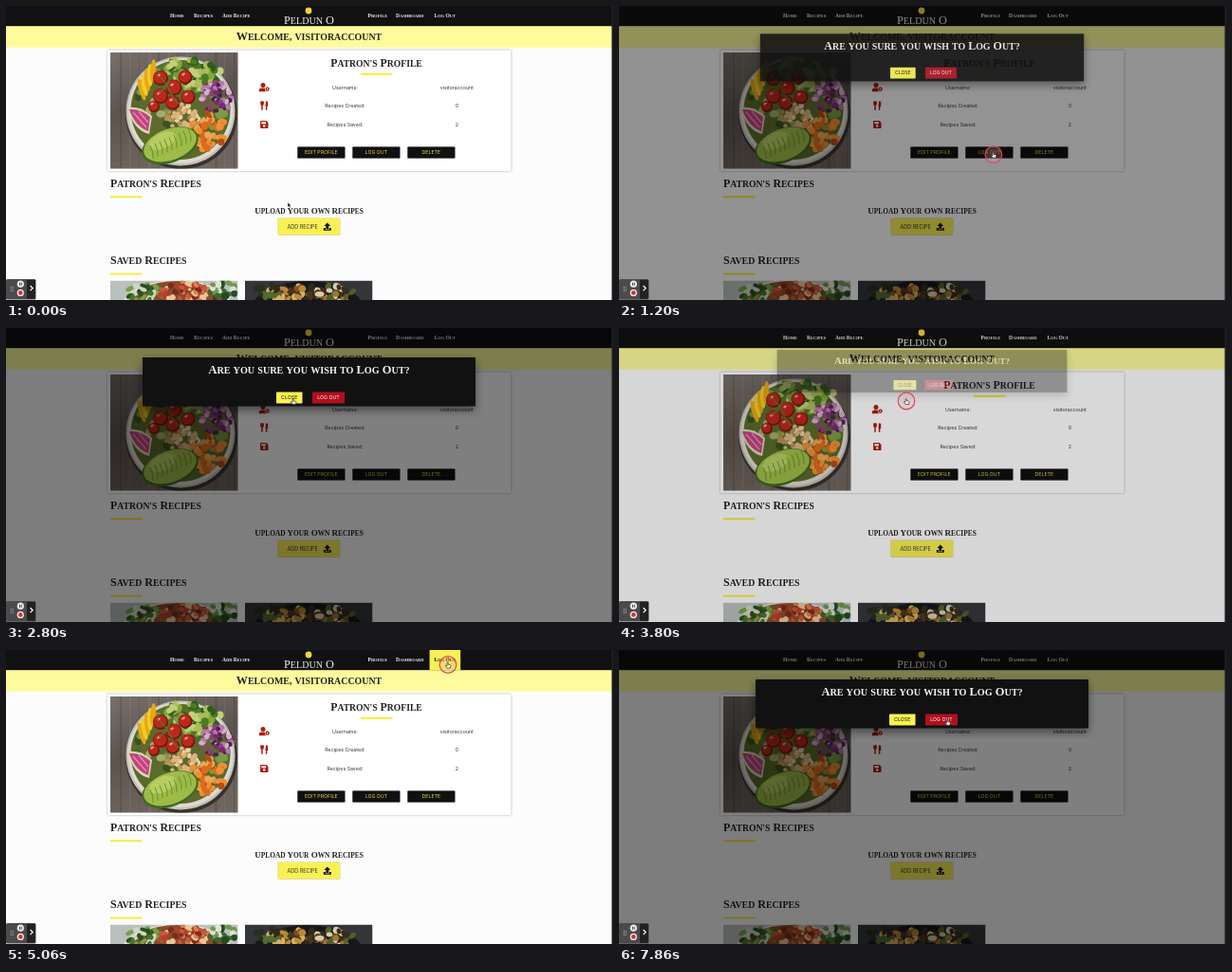
Write an HTML page that moves like this. It is 640 px wide and 310 px high and loops after 8 s.

```html
<!DOCTYPE html>
<html lang="en">
<head>
<meta charset="utf-8">
<title>Recipe profile</title>
<style>
html, body { margin: 0; width: 100%; height: 100%; overflow: hidden; background: #fcfcfc; }
svg { display: block; width: 640px; height: 310px; }
.serif { font-family: "Liberation Serif", "Times New Roman", serif; font-weight: 700; }
.sans { font-family: Inter, "Open Sans", sans-serif; font-size: 5.25px; }
.lift { filter: drop-shadow(0 .7px .7px rgba(0,0,0,.4)); }
</style>
</head>
<body>
<svg id="stage" viewBox="0 0 640 310" xmlns="http://www.w3.org/2000/svg"></svg>
<script>
const INK = '#111', TITLE = '#222', YELLOW = '#f9f055', RED = '#b01c0c', LOOP = 8000;
const stage = document.getElementById('stage');

// Seeded random numbers for the food textures
let seed = 11;
const rnd = () => (seed = seed * 16807 % 2147483647) / 2147483647;

const rect = (x, y, w, h, fill, more = '') =>
  `<rect x="${x}" y="${y}" width="${w}" height="${h}" fill="${fill}" ${more}/>`;
const dot = (x, y, r, fill, more = '') => `<circle cx="${x}" cy="${y}" r="${r}" fill="${fill}" ${more}/>`;
const blob = (x, y, rx, ry, fill, turn = 0) =>
  `<ellipse cx="${x}" cy="${y}" rx="${rx}" ry="${ry}" fill="${fill}" transform="rotate(${turn} ${x} ${y})"/>`;
const path = (d, fill, more = '') => `<path d="${d}" fill="${fill}" ${more}/>`;

// Capitals with slightly smaller capitals in place of lower case
function caps(x, y, text, size, fill = TITLE, anchor = 'middle', more = '') {
  const body = text.replace(/[a-z',?]+/g, s => `<tspan font-size="${size * 0.82}">${s.toUpperCase()}</tspan>`);
  return `<text class="serif" x="${x}" y="${y}" font-size="${size}" fill="${fill}" text-anchor="${anchor}" ${more}>${body}</text>`;
}
const label = (x, y, text, fill = '#333', more = '') =>
  `<text class="sans" x="${x}" y="${y}" fill="${fill}" text-anchor="middle" ${more}>${text}</text>`;

function scatter(n, x, y, rx, ry, r, colors) {
  let out = '';
  for (let i = 0; i < n; i++) {
    const a = rnd() * 6.283, d = Math.sqrt(rnd());
    out += blob((x + Math.cos(a) * d * rx).toFixed(1), (y + Math.sin(a) * d * ry).toFixed(1),
      (r * (0.7 + rnd() * 0.5)).toFixed(1), (r * (0.5 + rnd() * 0.4)).toFixed(1),
      colors[i % colors.length], Math.round(rnd() * 180));
  }
  return out;
}

function bowl() {
  let out = rect(110, 49, 135, 123, 'url(#wood)');
  for (let i = 0; i < 14; i++) out += rect(110 + i * 10, 49, 0.6 + rnd() * 3, 123, i % 2 ? '#332d2a' : '#98918a', 'opacity=".2"');
  out += blob(185, 114, 59, 58, '#38322e') + dot(184, 111, 57.5, '#c3c0b8') + dot(184, 110.5, 55.5, '#dddad0') +
    dot(184, 109.5, 52.5, '#5c6a2d');
  out += scatter(40, 184, 110, 49, 47, 5, ['#4a6a28', '#7b9a45', '#39521f', '#a3ad6a']);
  out += scatter(70, 196, 73, 33, 17, 4.5, ['#497c22', '#82a93c', '#315d1b', '#a8bd58', '#c3cf7c']);
  out += scatter(55, 222, 96, 17, 17, 3.2, ['#7b2a70', '#b678ae', '#512050', '#d5aecb', '#8f3e83']);
  for (let i = 0; i < 5; i++) out += blob(143 + i * 3, 88 - i * 5, 3, 12, i % 2 ? '#f5cb28' : '#e4a817', -16 + i * 5);
  out += scatter(40, 188, 117, 18, 15, 3.2, ['#d9b47e', '#edcfa0', '#bd8e54']);
  out += scatter(45, 213, 132, 19, 19, 4.6, ['#d96d1f', '#f08f34', '#b84b13', '#eda654']);
  out += path('M128 107q14-2 26 9l-3 19q-17-4-23-28z', '#d8d9b8') + path('M130 109q12-1 22 8l-2 15q-14-5-20-23z', '#c2437f') +
    path('M134 112l14 16M140 111l10 12', 'none', 'stroke="#e692b8" stroke-width="1.2"');
  out += blob(173, 147, 31, 18, '#3f6a1e', -20) + blob(173, 146, 29, 16.5, '#9dbb48', -20) + blob(165, 142, 15, 8, '#b7cd62', -25);
  for (let i = 0; i < 9; i++)
    out += path(`M${152 + i * 5} ${147 - i * 2.2}q4 8 3 14`, 'none', 'stroke="#638b2c" stroke-width=".9"');
  const tomatoes = [[163, 76, 8], [177, 86, 8.5], [163, 95, 8], [189, 75, 7.5], [176, 102, 7.5], [192, 96, 7.5], [156, 106, 6]];
  for (const [x, y, r] of tomatoes)
    out += dot(x, y, r, '#781610') + dot(x - 0.5, y - 0.6, r - 1.2, '#bd271c') + blob(x - 2, y - 3, 2, 1.1, '#f0a79b', -30);
  return out + path('M158 72q10 6 15 18t10 13M175 73l-6 12l-8 7', 'none', 'stroke="#4d7a2b" stroke-width="1.3"');
}

function thumbs() {
  return `<g clip-path="url(#thumbA)">` + rect(110, 289.5, 134.5, 21, '#b9c0bd') + blob(180, 318, 58, 29, '#e6e6df') +
    blob(180, 317, 52, 27, '#8d4a2a') +
    scatter(34, 148, 303, 20, 10, 4, ['#44752d', '#79a146', '#285021', '#cfd6bd']) +
    scatter(55, 188, 303, 28, 11, 3.4, ['#b8402a', '#d9824a', '#e9c69a', '#7d2a1d', '#c9593c']) +
    scatter(26, 230, 300, 15, 10, 4, ['#39682f', '#6f974d', '#254a20', '#dfe2d6']) + '</g>' +
    `<g clip-path="url(#thumbB)">` + rect(252, 289.5, 134.5, 21, '#34363a') + blob(318, 318, 58, 28, '#17181a') +
    scatter(50, 306, 304, 32, 9, 4.2, ['#b98a35', '#80501d', '#d6b163', '#4d3519', '#2c2a22']) +
    scatter(28, 346, 303, 20, 9, 4.2, ['#d8ccac', '#a5752f', '#52602c', '#3a2c1c']) +
    scatter(12, 275, 300, 14, 8, 3.5, ['#536b30', '#26301c']) + '</g>';
}

// Clickable areas
const pageHot = [[307.4, 148.6, 50, 12, 'EDIT PROFILE'], [365.4, 148.6, 50, 12, 'LOG OUT'], [423.4, 148.6, 50, 12, 'DELETE']];
const navHot = [446.6, 0, 32.6, 21.2];
const modalHot = [[285, 67.5, 27.5, 12], [323, 67.5, 34, 12]];
const inside = ([x, y, w, h], p) => p.x >= x && p.x <= x + w && p.y >= y && p.y <= y + h;

function page() {
  const nav = [[173, 'Home'], [198, 'Recipes'], [228, 'Add Recipe'], [381.5, 'Profile'], [411, 'Dashboard']];
  const rows = [['Username:', 'visitoraccount'], ['Recipes Created:', '0'], ['Recipes Saved:', '2']];
  let out = rect(0, 0, 640, 310, '#fcfcfc') + rect(0, 21, 640, 22.7, '#fdfb9c') + rect(0, 0, 640, 21.2, INK);
  out += rect(...navHot, YELLOW, 'id="navHover"');
  out += nav.map(([x, s]) => caps(x, 12.3, s, 5.5, '#eee', 'start')).join('') +
    caps(451.5, 12.3, 'Log Out', 5.5, '#eee', 'start', 'id="navOut"');
  out += dot(319, 5, 3.4, '#f0d63a') + caps(319.5, 18.6, 'Peldun O', 12.3, '#eee', 'middle', 'style="font-weight:400"');
  out += caps(319.5, 36.4, 'Welcome, visitoraccount', 12.1);

  out += `<g id="card">${rect(107, 46.5, 425.5, 127.5, '#fff', 'rx=".8"')}</g>`;
  out += `<g clip-path="url(#photo)">${bowl()}</g>`;
  out += caps(390.5, 63.6, "Patron's Profile", 11.8) + rect(374, 71, 33.5, 1.8, '#f8ea2a');
  rows.forEach(([a, b], i) => {
    const y = 87.5 + i * 19.7;
    out += label(357.5, y, a) + label(475.3, y, b);
  });
  out += dot(271, 83.6, 2.5, RED) + path('M266.8 90.3v-1.2q0-2.6 2.8-2.6h2.4q1.6 0 2 3.8z', RED) +
    dot(275.6, 87.6, 2.6, '#fff') + dot(275.6, 87.6, 1.5, 'none', `stroke="${RED}" stroke-width="1.4"`);
  out += path('M270 101v8.2M274.6 101v8.2', 'none', `stroke="${RED}" stroke-width="1.5" stroke-linecap="round"`) +
    path('M268.2 100.6h3.7v2.6q0 1.7-1.9 1.7t-1.8-1.7zM276.2 100.5v5.5h-2.6q0-5 2.6-5.5z', RED);
  out += path('M268.9 121h5.6l2 2v5.2q0 .8-.8.8h-6.8q-.8 0-.8-.8v-6.4q0-.8.8-.8z', RED) +
    rect(269.4, 122.2, 4.6, 2.1, '#fff') + dot(272.2, 126.5, 1.25, '#fff');
  pageHot.forEach(([x, y, w, h, s], i) => {
    out += `<g class="lift">${rect(x, y, w, h, INK, `id="btn${i}" rx=".7"`)}</g>` +
      label(x + w / 2, 156.4, s, '#e6d945', `id="lab${i}"`);
  });

  out += caps(110, 190.7, "Patron's Recipes", 11.8, TITLE, 'start') + rect(110, 200.4, 33.5, 1.8, '#f8ea2a');
  out += caps(319.5, 218.5, 'Upload Your Own Recipes', 9);
  out += `<g class="lift">${rect(286.7, 223.7, 65.5, 17.8, YELLOW, 'rx=".8"')}</g>` +
    label(312.7, 234.5, 'ADD RECIPE', '#333', 'style="font-size:5.5px"') +
    path('M338.8 228.4l3.4 3.6h-2v3.2h-2.8v-3.2h-2z', INK) +
    path('M334.8 233.9h2v1.9h4v-1.9h2v2.8h-8z', INK);
  out += caps(110, 271.8, 'Saved Recipes', 12, TITLE, 'start') + rect(110, 281.6, 33.5, 1.8, '#f8ea2a');
  return out + thumbs();
}

function modal() {
  const [c, o] = modalHot;
  return rect(144, 31, 351, 51.5, INK, 'style="filter:drop-shadow(0 4px 5px rgba(0,0,0,.45))"') +
    caps(319.5, 48.4, 'Are you sure you wish to Log Out?', 12.4, '#f4f4f4') +
    rect(...c, '#fbf250', 'rx=".7"') + label(298.7, 75.4, 'CLOSE', INK) +
    rect(...o, '#b0101d', 'rx=".7"') + label(340, 75.4, 'LOG OUT', '#fff');
}

function recorder() {
  let out = rect(0, 288, 31.5, 21.5, '#4b4b4b', 'rx="1.5"') + rect(22, 288.8, 9, 20, '#222', 'rx="1"') +
    dot(15.3, 293.2, 3.6, '#eee') + rect(14, 291.7, 0.9, 3, '#333') + rect(15.8, 291.7, 0.9, 3, '#333') +
    dot(15.3, 302.4, 3.6, '#eee') + dot(15.3, 302.4, 2.3, '#d5303a');
  for (let i = 0; i < 6; i++) out += dot(5.2 + (i % 2) * 2, 296.3 + (i >> 1) * 2, 0.6, '#bbb');
  return out + path('M25.6 295l2.6 2.6l-2.6 2.6', 'none', 'stroke="#fff" stroke-width="1.2"');
}

const clip = (id, x, y, w, h) => `<clipPath id="${id}">${rect(x, y, w, h, '#000')}</clipPath>`;
stage.innerHTML = '<defs>' + clip('photo', 110, 49, 134.5, 122.5) + clip('thumbA', 110, 289.5, 134.5, 21) +
  clip('thumbB', 252, 289.5, 134.5, 21) +
  '<linearGradient id="wood" x2=".3" y2="1"><stop stop-color="#77706a"/><stop offset=".5" stop-color="#5d544e"/>' +
  '<stop offset="1" stop-color="#6f655e"/></linearGradient></defs>' +
  page() + rect(0, 0, 640, 310, '#000', 'id="shade"') + `<g id="modal">${modal()}</g>` + recorder() +
  rect(638.6, 0, 1.4, 310, '#222') +
  '<circle id="ring" r="8.8" fill="#f4a0a8" fill-opacity=".25" stroke="#d84a5a" stroke-width="1.2"/>' +
  '<g id="arrow">' + path('M0 0v5.2l1.3-1l.9 1.9l.9-.4l-.8-1.9h1.7z', '#111', 'stroke="#fff" stroke-width=".5"') + '</g>' +
  '<g id="hand">' + path('M-.9-2.6q.6-.7 1.1 0v1.8l2.3.6q.6.3.4 1l-.5 2.2h-3.3l-1.7-2.3q.1-.8.9-.4l.8.5z',
    '#fff', 'stroke="#111" stroke-width=".6"') + '</g>';

const el = {};
stage.querySelectorAll('[id]').forEach(n => el[n.id] = n);

const clamp = v => Math.min(1, Math.max(0, v));
const route = [[0, 297, 207], [60, 297, 207], [600, 394.5, 157.5], [1500, 395, 157], [2600, 303, 77.5], [3950, 303, 77.5],
  [4400, 466, 16], [5560, 466, 16], [5860, 370.5, 55], [6050, 370.5, 55], [6600, 346.5, 76.3], [LOOP, 346.5, 76.3]];
const clicks = [1000, 3600, 5000];
const opens = [1080, 5080], closes = 3700, FADE = 250;

function pointer(t) {
  const i = route.findIndex(k => k[0] > t);
  const [t0, x0, y0] = route[i - 1], [t1, x1, y1] = route[i];
  const u = (t - t0) / (t1 - t0), e = u * u * (3 - 2 * u);
  return { x: x0 + (x1 - x0) * e, y: y0 + (y1 - y0) * e };
}

// 0 is closed, 1 is open
function openness(t) {
  if (t >= closes && t < opens[1]) return (1 - clamp((t - closes) / FADE)) ** 2;
  const start = t < closes ? opens[0] : opens[1];
  return 1 - (1 - clamp((t - start) / FADE)) ** 3;
}

const show = (node, on) => node.setAttribute('visibility', on ? 'visible' : 'hidden');

function draw(t) {
  const p = pointer(t), m = openness(t), free = m < 0.01;

  el.shade.setAttribute('opacity', 0.5 * m ** 1.15);
  el.modal.setAttribute('opacity', m);
  const s = 0.8 + 0.2 * m, rise = -17.4 * (1 - m);
  el.modal.setAttribute('transform', `translate(319.5 ${56.75 + rise}) scale(${s}) translate(-319.5 -56.75)`);

  pageHot.forEach((b, i) => {
    const on = free && inside(b, p);
    el['btn' + i].setAttribute('fill', on ? YELLOW : INK);
    el['lab' + i].setAttribute('fill', on ? INK : '#e6d945');
  });
  const onNav = free && inside(navHot, p);
  show(el.navHover, onNav);
  el.navOut.setAttribute('fill', onNav ? INK : '#eee');

  const h = free ? clamp((174 - p.y) / 8) * clamp((p.y - 46) / 8) : 0;
  el.card.style.filter = `drop-shadow(0 ${0.8 + 1.2 * h}px ${0.8 + 2 * h}px rgba(0,0,0,${0.35 + 0.15 * h}))`;

  const click = clicks.find(c => t >= c && t < c + 320);
  show(el.ring, click !== undefined);
  el.ring.setAttribute('cx', p.x);
  el.ring.setAttribute('cy', p.y - 0.5);

  const hand = [...pageHot, navHot, ...modalHot].some(b => inside(b, p));
  show(el.hand, hand);
  show(el.arrow, !hand);
  el[hand ? 'hand' : 'arrow'].setAttribute('transform', `translate(${p.x} ${p.y})`);
}

function tick() {
  draw(performance.now() % LOOP);
  requestAnimationFrame(tick);
}
tick();
</script>
</body>
</html>
```
